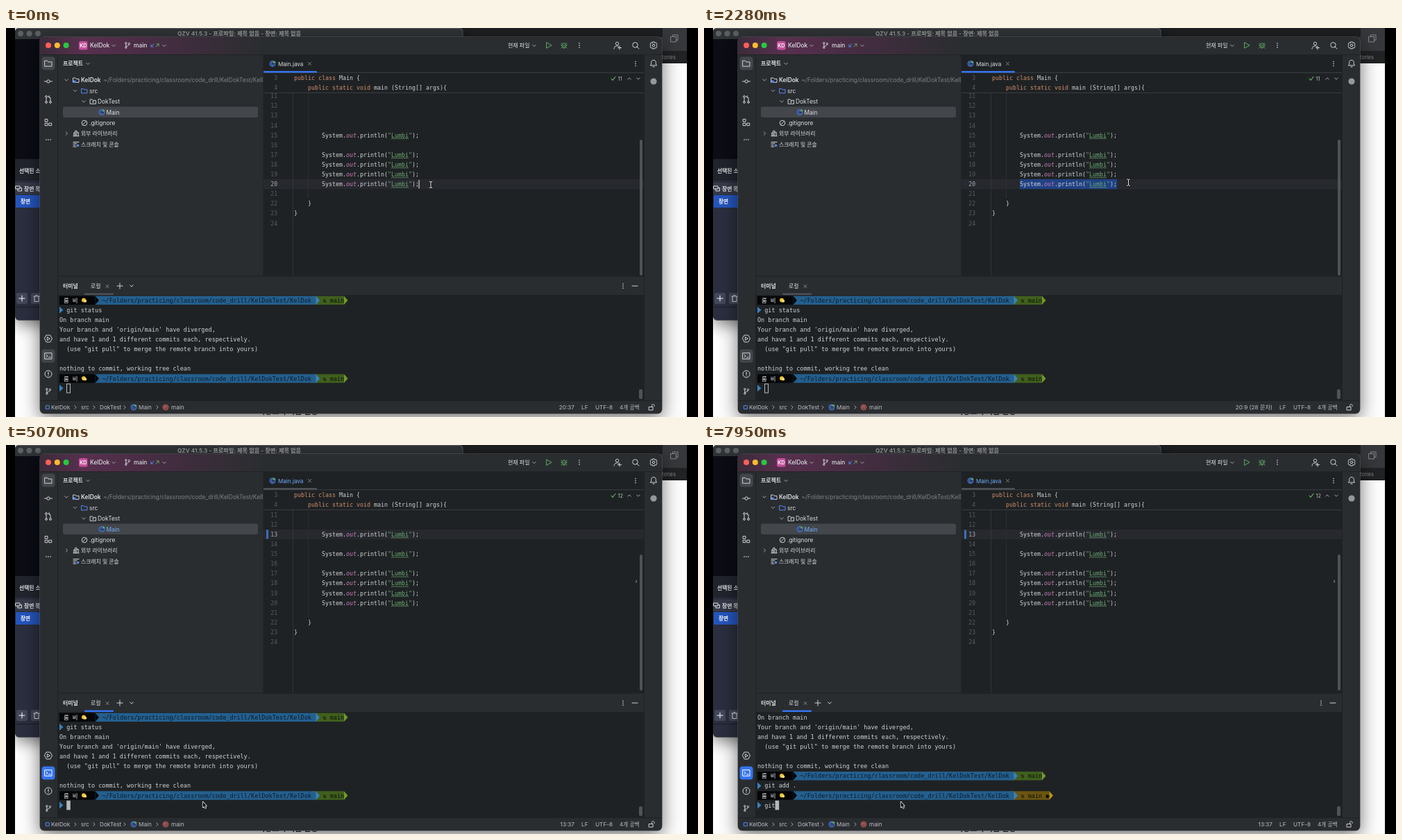
An HTML page with a canvas for the animation above (8000 ms loop, 997 by 561 pixels).

```html
<!DOCTYPE html>
<html lang="ko">
<head>
<meta charset="utf-8">
<title>Editor and terminal</title>
<style>
html, body { margin: 0; width: 100%; height: 100%; overflow: hidden; background: #000; }
canvas { display: block; width: 997px; height: 561px; }
</style>
</head>
<body>
<canvas id="stage" width="997" height="561"></canvas>
<script>
const c = document.getElementById('stage').getContext('2d');
const LOOP = 8000;
const UI = 'Inter, "Noto Sans CJK KR", sans-serif';
const MONO = '"DejaVu Sans Mono", "Noto Sans CJK KR", monospace';
const EDITOR = '#1f2224', PANEL = '#2a2d30', SELECTED = '#43464a', LINE = '#393c40';
const TEXT = '#dcdee2', SOFT = '#bcbec4', DIM = '#9da0a6', MONO_TEXT = '#d0d2d6';
const BLUE = '#3574f0', GREEN = '#5fad65', INACTIVE = '#4e5157';
const CODE_W = 5, TERM_W = 5.11, ROW = 14.1;
const PROJECT = 'KelDok', NAME = 'Lumbi';
const PATH = '~/Folders/practicing/classroom/code_drill/KelDokTest/' + PROJECT;

const CLICK = 3120, PASTE = 3780, CHECKED = 4110, FOCUS = 5070, ENTER = 7440, PROMPT = 7620;
const typed = [
  ['git add .', [5520, 5850, 6000, 6090, 6210, 6300, 6390, 6480, 6600]],
  ['git', [7740, 7830, 7950]]
];
const pointerPath = [
  [0, 612, 226], [480, 612, 226], [780, 597, 225], [1320, 456, 224], [1890, 456, 224],
  [2250, 611, 223], [2370, 613, 222], [2700, 613, 222], [2820, 613, 146], [3000, 613, 146],
  [3180, 612, 127], [3840, 612, 127], [4200, 509, 209], [4560, 440, 290], [4620, 424, 312],
  [4890, 284, 519], [LOOP, 284, 519]
];

function rect(x, y, w, h, color, r = 0) {
  c.fillStyle = color;
  c.beginPath();
  c.roundRect(x, y, w, h, r);
  c.fill();
}

function text(s, x, y, color = TEXT, size = 8.4, weight = 400, family = UI, align = 'left') {
  c.font = `${weight} ${size}px ${family}`;
  c.textAlign = align;
  c.fillStyle = color;
  c.fillText(s, x, y + 3);
}

const code = (s, x, y, color = MONO_TEXT, style = 400) => text(s, x, y, color, 8.31, style, MONO);
const term = (s, x, y, color = MONO_TEXT) => text(s, x, y, color, 8.49, 400, MONO);

// Icon paths are drawn around their own centre.
function icon(d, x, y, color = '#ced0d6', fill = false, width = 1) {
  c.save();
  c.translate(x, y);
  const p = new Path2D(d);
  c.strokeStyle = c.fillStyle = color;
  c.lineWidth = width;
  c.lineCap = c.lineJoin = 'round';
  fill ? c.fill(p) : c.stroke(p);
  c.restore();
}

function disc(x, y, r, color) {
  c.fillStyle = color;
  c.beginPath();
  c.arc(x, y, r, 0, 7);
  c.fill();
}

function ring(x, y, r, color = '#ced0d6') {
  c.strokeStyle = color;
  c.lineWidth = 1;
  c.beginPath();
  c.arc(x, y, r, 0, 7);
  c.stroke();
}

function shadow(blur, offset, alpha, paint) {
  c.save();
  c.shadowColor = `rgba(0,0,0,${alpha})`;
  c.shadowBlur = blur;
  c.shadowOffsetY = offset;
  paint();
  c.restore();
}

const down = (x, y, color = DIM) => icon('M-2.3-1.2L0 1.2L2.3-1.2', x, y, color);
const up = (x, y, color = DIM) => icon('M-2.3 1.2L0-1.2L2.3 1.2', x, y, color);
const right = (x, y, color = DIM) => icon('M-1.2-2.3L1.2 0L-1.2 2.3', x, y, color);
const cross = (x, y) => icon('M-2-2L2 2M2-2L-2 2', x, y, DIM, false, .8);
const plus = (x, y, r, color) => icon(`M${-r} 0H${r}M0 ${-r}V${r}`, x, y, color);
const folder = (x, y, s, color) => icon(`M${-s}${-s * .75}h${s * .7}l${s * .3} ${s * .35}h${s}v${s * 1.25}h${-2 * s}z`, x, y, color);
const branch = (x, y, color) => {
  icon('M-2.2-2V2M2.4-1.2C2.4 1-1 .2-2.2 2', x, y, color);
  [[-2.2, -3.2], [2.4, -2.4], [-2.2, 3.2]].forEach(([a, b]) => ring(x + a, y + b, 1.2, color));
};
const dots = (x, y, flat) => [-3, 0, 3].forEach(k => disc(x + (flat ? k : 0), y + (flat ? 0 : k), .85, '#ced0d6'));

function classIcon(x, y) {
  disc(x, y, 3.9, '#25324d');
  ring(x, y, 3.9, '#548af7');
  text('C', x, y - .6, '#548af7', 6.2, 600, UI, 'center');
  icon('M1.4-4.4L5-2.4L1.4-.4z', x, y, GREEN, true);
}

function backdrop() {
  rect(0, 0, 997, 561, '#000');
  rect(13, 0, 968, 561, '#fdfdfd');
  rect(640, 0, 341, 33, '#35373a');
  rect(640, 0, 306, 13, '#1d1f20');
  rect(640, 33, 341, 18, '#202224');
  text('tories', 945, 42, '#8b8d90', 7.5);
  icon('M-5-2.5h7.5v7.5h-7.5zM-2.5-2.5v-2.5h7.5v7.5h-2.5', 963, 15, '#85878a');

  c.save();
  c.beginPath();
  c.rect(13, 0, 968, 561);
  c.clip();
  shadow(22, 6, .5, () => rect(13, 0, 645.5, 422, '#5a5d61', [5, 5, 6, 6]));
  rect(13, 1, 644.5, 420, '#2a2e3e', [5, 5, 6, 6]);
  rect(13, 1, 644.5, 15, '#303336', [5, 5, 0, 0]);
  [21, 33.5, 46].forEach(x => disc(x, 8, 4, '#5d6063'));
  text('QZV 41.5.3 - 프로파일: 제목 없음 - 장면: 제목 없음', 247, 7.5, '#a0a2a4', 8.2, 600);
  rect(13, 16, 36, 173, '#0b0c14');
  rect(13, 189, 36, 31, '#21242d');
  text('선택된 소', 19, 205.5, '#e3e4e6', 7.8, 600);
  rect(13, 223, 36, 17, '#363a48');
  icon('M-4-3.5h6v4h-6zM-1 .5v3h5.5v-4.5h-2', 18, 231.5, '#dfe1e5');
  text('장면 목', 26, 231.5, '#e3e4e6', 7.8, 600);
  rect(14, 241, 36, 18, '#2455bd');
  text('장면', 21, 250, '#fff', 7.6, 600);
  rect(15, 382, 16, 16, '#42475a', 2);
  rect(36, 382, 16, 16, '#42475a', 2);
  plus(23, 390, 4, '#fff');
  icon('M-4-3H4M-3-3V4.5H3V-3M-1-4.5H1', 44, 390, '#dfe1e5');
  rect(13, 402, 36, 1, '#1b1d25');
  text('저장소의 이름 설명', 363, 554, '#222', 11, 700);
  c.restore();
}

function frame() {
  c.save();
  c.beginPath();
  c.rect(13, 0, 968, 561);
  c.clip();
  shadow(26, 7, .55, () => rect(48.5, 12.5, 897, 544, '#595b5e', 7));
  c.restore();
  rect(49, 13, 896, 543, PANEL, 6);
  const g = c.createLinearGradient(49, 0, 370, 0);
  [[0, '#3b2b39'], [.2, '#58304f'], [.45, '#4a2d45'], [1, PANEL]].forEach(s => g.addColorStop(...s));
  rect(49, 13, 330, 25.5, g, [6, 0, 0, 0]);
  rect(49, 38, 896, 1, EDITOR);
  rect(74, 39, 1, 498, EDITOR);
  rect(919, 39, 1, 498, EDITOR);
}

function titleBar() {
  ['#ff5f57', '#febc2e', '#28c840'].forEach((k, i) => disc(61 + 12.8 * i, 25, 4, k));
  rect(105, 19, 12.5, 12.5, '#c44f9b', 2.5);
  text('KD', 111.2, 25, '#fff', 7, 600, UI, 'center');
  text(PROJECT, 121, 25, TEXT, 8.4, 500);
  down(155, 25.5);
  branch(175, 25);
  text('main', 184, 25, TEXT, 8.4, 500);
  icon('M2-2L-2 2M-2-1V2H1', 211, 25, '#548af7');
  icon('M-2 2L2-2M-1-2H2V1', 218, 25, GREEN);
  down(228, 25.5);
  text('현재 파일', 723, 25, TEXT, 8, 500);
  down(761, 25.5);
  icon('M-3-4L4 0L-3 4z', 782, 25, GREEN);
  icon('M-2.5-1C-2.5-4 2.5-4 2.5-1V1C2.5 5-2.5 5-2.5 1zM0-1V4M-4.3 0h1.8M2.5 0h1.8M-4-3l1.5 1.5M4-3L2.5-1.5M-4 4l1.6-1.6M4 4L2.4 2.4', 804, 25, GREEN);
  dots(826, 25);
  ring(880.5, 22.5, 2.2);
  icon('M-5 5C-5 0 2 0 2 2M3 1V6M.5 3.5H5.5', 881, 25);
  ring(906.5, 24.5, 3.7);
  icon('M2 2L5 5', 907, 25);
  icon('M-1.3-5h2.6l.5 1.5L3.6-4 5-1.5 3.8 0 5 1.5 3.6 4 1.8 3.5 1.3 5h-2.6l-.5-1.5L-3.6 4-5 1.5-3.8 0-5-1.5-3.6-4-1.8-3.5z', 933, 25);
  ring(933, 25, 1.7);
}

function sideBars(focused) {
  rect(51.5, 41.5, 19, 19, SELECTED, 4);
  folder(61, 51, 5, '#ced0d6');
  ring(61, 77, 2.2);
  icon('M-5.5 0H-2.2M2.2 0H5.5', 61, 77);
  icon('M-3-2V3M3 3V-2Q3-4 0-4M1.5-5.5L0-4L1.5-2.5', 61, 103);
  [[-3, -4], [-3, 4], [3, 4]].forEach(([a, b]) => ring(61 + a, 103 + b, 1.4));
  icon('M-4.5-4.5h3.5v3.5h-3.5zM-4.5 1.2h3.5v3.5h-3.5zM1.2 1.2h3.5v3.5h-3.5z', 61, 136);
  dots(61, 161, true);
  icon('M-2.7-5h5.4L5.5 0 2.7 5h-5.4L-5.5 0z', 61, 448);
  icon('M-1.3-2.2L2.3 0L-1.3 2.2z', 61, 448);
  rect(51.5, 463.5, 19, 19, focused ? BLUE : SELECTED, 4);
  icon('M-5-4.3H5V4.3H-5zM-3-1.8L-1 0L-3 1.8M.5 2H3', 61, 473, focused ? '#fff' : '#ced0d6');
  ring(61, 499, 5);
  icon('M0-2.7V.5M0 2.4V2.5', 61, 499, '#ced0d6', false, 1.2);
  branch(61, 524);
  icon('M-4.5 3H4.5L3.3 1V-1.5C3.3-5.7-3.3-5.7-3.3-1.5V1zM-1 5H1', 933, 51);
  disc(933, 77, 4.6, '#94979c');
}

function projectTree(changed) {
  text('프로젝트', 82, 51, TEXT, 7.9, 600);
  down(118, 51.5);
  rect(82, 113.5, 281, 15.5, SELECTED, 3);
  down(87, 75);
  folder(101, 75, 4, '#ced0d6');
  rect(97, 75.5, 3.5, 3.5, '#548af7');
  text(PROJECT, 108, 75, TEXT, 8.4, 600);
  c.save();
  c.beginPath();
  c.rect(75, 60, 295, 30);
  c.clip();
  text(PATH, 140.5, 75, '#7d8087', 8.4);
  c.restore();
  down(99.5, 90.5);
  folder(113, 90.5, 4, '#548af7');
  text('src', 120, 90.5);
  down(112, 106);
  folder(125.5, 106, 4, '#ced0d6');
  ring(125.5, 106.5, 1);
  text('DokTest', 132, 106);
  classIcon(138, 121.5);
  text('Main', 144.5, 121.5, changed ? '#70aeff' : TEXT);
  ring(113, 137, 3.8);
  icon('M-2.6 2.6L2.6-2.6', 113, 137);
  text('.gitignore', 120, 137);
  right(87.5, 152);
  icon('M-4 3.8H4M-3.3 3.5V-1h2V3.5M-1.3 3.5V-3.7H.9V3.5M.9-1.5h2.4V3.5', 101, 152);
  text('외부 라이브러리', 108, 152, TEXT, 7.8);
  icon('M-4-3H4M-4-.8H1M-4 1.5H-1M-4 3.7H0', 101, 167.5);
  disc(103.5, 169.5, 1.8, '#548af7');
  text('스크래치 및 콘솔', 108, 167.5, TEXT, 7.8);
}

function println(y, checked = true) {
  code('System.', 455, y);
  code('out', 455 + 7 * CODE_W, y, '#c77dbb', 'italic 400');
  code('.println(', 455 + 10 * CODE_W, y);
  code(`"${NAME}"`, 455 + 19 * CODE_W, y, '#6aab73');
  code(');', 455 + 26 * CODE_W, y);
  if (!checked) return;
  c.strokeStyle = '#5f9a68';
  c.lineWidth = .8;
  c.beginPath();
  for (let x = 0; x <= 25; x++) c.lineTo(555 + x, y + 4.7 + .8 * Math.sin(x * 2.1));
  c.stroke();
}

const lineNumber = (n, y, color = '#555a63') => text(n, 391, y, color, 8.1, 400, MONO, 'right');

function editor(t, pointer) {
  const moved = t >= CLICK, pasted = t >= PASTE, changed = t >= CHECKED;
  const shift = pasted ? 2.5 : 0, active = moved ? 13 : 20;
  const rowY = n => 98.2 + shift + (n - 11) * ROW;
  rect(370.5, 39, 549, 319, EDITOR);
  rect(371, 64, 548, 1, LINE);
  rect(371, 62, 77, 2.6, t < FOCUS ? BLUE : INACTIVE, 1);
  classIcon(384, 51.5);
  text('Main.java', 392, 51.5, changed ? '#70aeff' : TEXT, 8.1);
  cross(437.5, 51.5);
  dots(907, 51.5);

  c.save();
  c.beginPath();
  c.rect(371, 94, 548, 263);
  c.clip();
  rect(371, rowY(active) - 7, 548, ROW, '#27292f');
  rect(413, 94, 1, 263, '#313438');
  rect(435, 94, 1, rowY(21) - 87, '#2b2e31');
  if (pasted) rect(375, rowY(13) - 6.5, 3, 13, '#3b6fb5');
  for (let n = 11; n <= 24; n++) lineNumber(n, rowY(n), n === active ? '#a9acb3' : undefined);

  let caretX = 595;
  if (!moved && t > 780) {
    const col = Math.max(0, Math.min(28, Math.round((pointer[0] - 455) / CODE_W)));
    caretX = t > 1320 ? 455 : 455 + col * CODE_W;
    rect(caretX, rowY(20) - 7, 595 - caretX, ROW, '#214283');
  } else if (moved && !pasted) caretX = 455;
  [15, 17, 18, 19, 20].forEach(n => println(rowY(n)));
  if (pasted) println(rowY(13), changed);
  code('}', 435, rowY(22));
  code('}', 415, rowY(23));
  if (t < 1890 || moved && t < 4680) rect(caretX - .5, rowY(active) - 6, 1.2, 12.5, '#ced0d6');
  rect(913, pasted ? 158 : 161, 4, 196, '#505355', 2);
  if (pasted) rect(907.5, 195, 1.2, 3.5, '#8290a5');
  c.restore();

  rect(371, 93, 548, 1, LINE);
  lineNumber(3, 72);
  lineNumber(4, 86);
  code('public class', 415, 72, '#cf8e6d');
  code('Main {', 480, 72);
  code('public static void', 435, 86, '#cf8e6d');
  code('main (String[] args){', 530, 86);
  icon('M-3 0L-1 2.4L3-2.6', 875, 73, GREEN, false, 1.1);
  text(changed ? '12' : '11', 881.5, 73, SOFT, 7.4);
  up(898, 73);
  down(911, 73);
}

const TIP = 5.5;

// A prompt segment: a flat body with a brighter arrow tip.
function segment(x, end, y, body, tip) {
  const edge = end - TIP;
  rect(x, y - 6.3, edge - x, 12.6, body);
  icon(`M0-6.3L${TIP} 0L0 6.3z`, edge, y, tip, true);
}

function prompt(y, dirty) {
  dirty ? segment(440, 503, y, '#6b5510', '#b8921c') : segment(440, 492.5, y, '#415f1d', '#6f9a2c');
  segment(125, 452, y, '#245f8e', '#3a82bd');
  segment(77, 134, y, '#050607', '#050607');
  text('룸 비', 83, y, '#f0f1f2', 8.4, 500, MONO);
  disc(112, y - .3, 3, '#f2c230');
  disc(114.2, y + 1, 2, '#f6dd82');
  term(PATH, 138.5, y, '#0c1b28');
  term('⇅ main' + (dirty ? ' ●' : ''), 456.5, y, '#0d100a');
}

function command(s, y) {
  icon('M-2.5-5L3 0L-2.5 5z', 79.5, y, '#3a82bd', true);
  term(s, 87.2, y);
}

const output = [
  'On branch main',
  "Your branch and 'origin/main' have diverged,",
  'and have 1 and 1 different commits each, respectively.',
  '  (use "git pull" to merge the remote branch into yours)',
  '',
  'nothing to commit, working tree clean'
];

function terminal(t, focused) {
  rect(75, 357.5, 844, 1, EDITOR);
  text('터미널', 82, 372, TEXT, 7.9, 600);
  text('로컬', 122, 372, TEXT, 7.9);
  cross(146, 372.5);
  if (focused || t < 480) {
    plus(164, 372, 4);
    down(181, 372, '#ced0d6');
    dots(889, 372);
    icon('M-4 0H4', 906, 372);
  }
  rect(75, 385, 844, 152, EDITOR);
  rect(113, 382.5, 42, 2.5, focused ? BLUE : INACTIVE, 1);
  const scroll = t < ENTER ? 0 : t < PROMPT ? 1 : 2;
  const y = n => 392.7 + ROW * (n - scroll);
  c.save();
  c.beginPath();
  c.rect(75, 385, 844, 152);
  c.clip();
  prompt(y(0));
  command('git status', y(1));
  output.forEach((s, i) => term(s, 77, y(2 + i)));
  prompt(y(8));
  const [first, second] = typed.map(([s, times]) => s.slice(0, times.filter(k => t >= k).length));
  command(first, y(9));
  if (scroll === 2) {
    prompt(y(10), true);
    command(second, y(11));
  }
  const x = scroll === 1 ? 77 : 87.2 + TERM_W * (scroll ? second : first).length;
  if (focused) rect(x, 512.8, 5.6, 13.5, '#b5b7bc');
  else {
    c.strokeStyle = '#b5b7bc';
    c.lineWidth = 1;
    c.strokeRect(x + .3, 513.3, 5, 12.8);
  }
  rect(912, 521, 5, 14, '#505355', 2);
  c.restore();
}

function statusBar(t) {
  rect(49, 537, 896, 1, EDITOR);
  icon('M-2.3-2.3H2.3V2.3H-2.3z', 60, 547, '#548af7');
  [[PROJECT, 65], ['src', 108], ['DokTest', 135], ['Main', 191], ['main', 238]]
    .forEach(([s, x]) => text(s, x, 547, SOFT, 8.2));
  [100, 127, 171, 218].forEach(x => right(x, 547));
  classIcon(184, 547);
  disc(230, 547, 3.8, '#5a3436');
  ring(230, 547, 3.8, '#db5c5c');
  text('m', 230, 546.3, '#e58a8a', 5.5, 500, UI, 'center');
  const place = t < 1560 ? '20:37' : t < CLICK ? '20:9 (28 문자)' : t < PASTE ? '13:9' : '13:37';
  text(place, 819, 547, SOFT, 8.2, 400, UI, 'right');
  text('LF', 829, 547, SOFT, 8.2);
  text('UTF-8', 849, 547, SOFT, 8.2);
  text('4개 공백', 884, 547, SOFT, 7.8);
  icon('M-3.5-.5H2V4H-3.5zM.5-.5V-2.5C.5-5 4-5 4-2.5V-1.5', 930, 547);
}

function pointerAt(t) {
  const i = pointerPath.findIndex(p => p[0] > t);
  const [a, ax, ay] = pointerPath[i - 1], [b, bx, by] = pointerPath[i];
  const k = (t - a) / (b - a);
  return [ax + (bx - ax) * k, ay + (by - ay) * k];
}

function drawPointer([x, y]) {
  if (y > 357) {
    const arrow = 'M-.4-4.5V3.6L1.4 2L2.7 4.8L4 4.2L2.7 1.5H4.8z';
    icon(arrow, x, y, '#fff', false, 1.5);
    icon(arrow, x, y, '#050505', true);
  } else {
    const beam = 'M-2-4.8Q0-4.8 0-3.4Q0-4.8 2-4.8M0-3.4V3.4M-2 4.8Q0 4.8 0 3.4Q0 4.8 2 4.8';
    icon(beam, x, y, '#08090a', false, 2.2);
    icon(beam, x, y, '#f2f2f2');
  }
}

function draw(t) {
  const focused = t >= FOCUS, pointer = pointerAt(t);
  backdrop();
  frame();
  titleBar();
  sideBars(focused);
  projectTree(t >= CHECKED);
  editor(t, pointer);
  terminal(t, focused);
  statusBar(t);
  drawPointer(pointer);
}

const start = performance.now();
function tick() {
  draw((performance.now() - start) % LOOP);
  requestAnimationFrame(tick);
}
tick();
</script>
</body>
</html>
```
